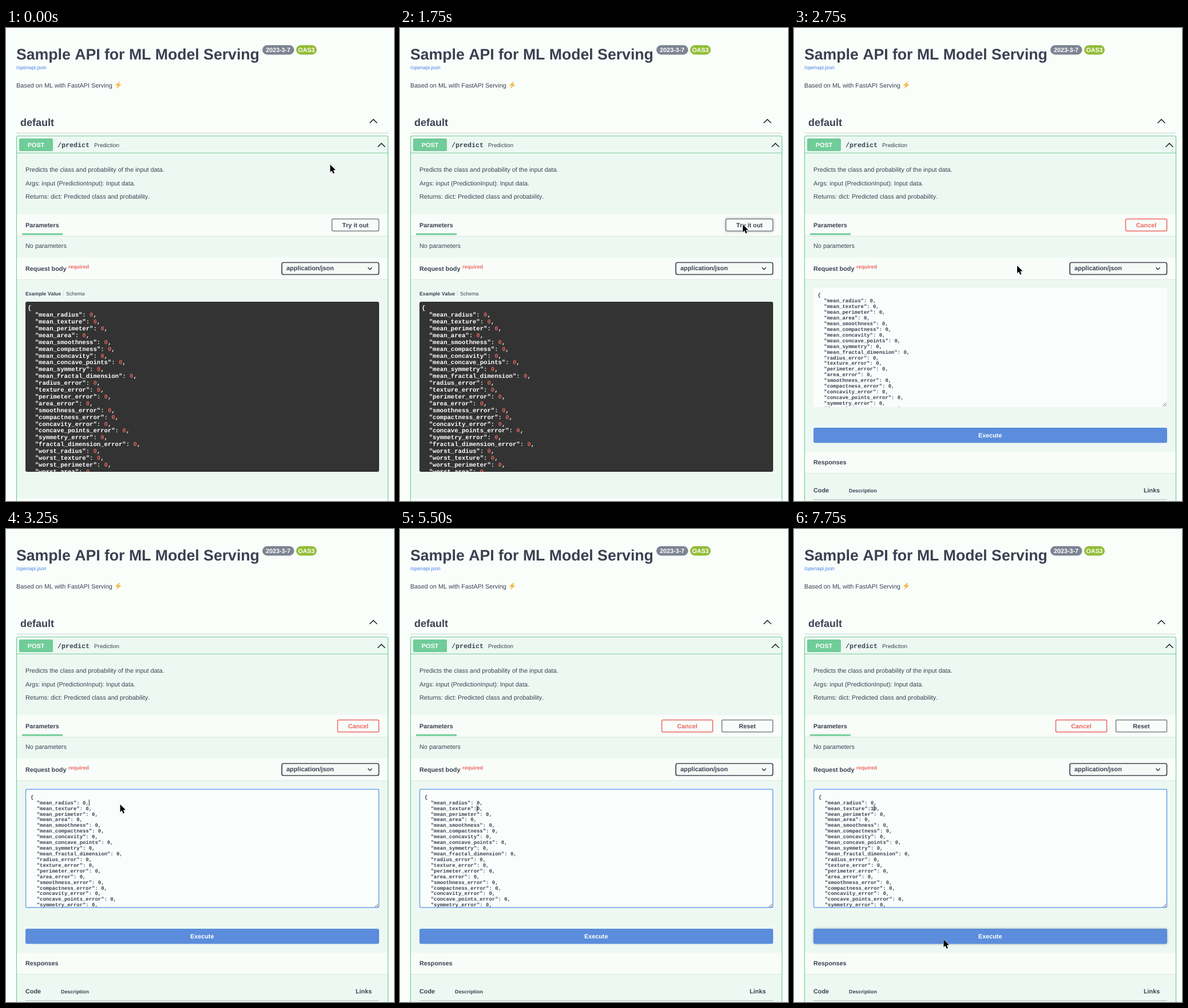
Recreate the animation shown at these times as an HTML page. Size 678x826 px, loop 8 s.

```html
<!DOCTYPE html>
<html lang="en">
<head>
<meta charset="utf-8">
<title>Sample API for ML Model Serving</title>
<style>
html, body { margin: 0; width: 100%; height: 100%; overflow: hidden; background: #f9fefb; }
svg { display: block; width: 100%; height: 100%; }
text {
  font: 10.87px "Liberation Sans", Arial, sans-serif;
  font-kerning: none; text-rendering: geometricPrecision;
  fill: #3b4151; white-space: pre;
}
.b { font-weight: 700; font-size: 10.8px; }
.s { font-size: 8.9px; }
.mid { text-anchor: middle; }
.w { fill: #fff; }
.mono { font-family: "Liberation Mono", "Courier New", monospace; font-weight: 700; }
.band { fill: #f8fdfa; }
.edge { fill: #000; opacity: .07; }
.green { fill: #70cc98; }
.btn { fill: #f8fdfa; stroke: #7d8088; stroke-width: 1.5; }
.red { stroke: #f0655d; }
text.red { fill: #f0655d; stroke: none; }
.pressed .red { stroke: #b65f5d; stroke-width: 2; }
.pressed text.red { fill: #a4504f; stroke: none; }
.line { fill: none; stroke: #25282f; stroke-width: 1.6; }
.hover { filter: drop-shadow(0 0 2px rgba(0, 0, 0, .3)); }
</style>
</head>
<body>
<svg viewBox="0 0 678 826">
  <defs>
    <clipPath id="darkClip"><rect x="34" y="478" width="618" height="297"/></clipPath>
    <clipPath id="editClip"><rect x="34" y="453" width="618" height="209"/></clipPath>
  </defs>

  <text class="b" x="18" y="55" style="font-size:26.65px">Sample API for ML Model Serving</text>
  <rect x="448" y="30" width="55.500" height="16.500" rx="8.200" fill="#7d8492"/>
  <text class="b w mid" x="475.500" y="42">2023-3-7</text>
  <rect x="507" y="30" width="36" height="16.500" rx="8.200" fill="#93bd38"/>
  <text class="b w mid" x="525" y="42" style="font-size:10.6px">OAS3</text>
  <text class="s" x="18" y="72" style="fill:#4681e6">/openapi.json</text>
  <text x="18" y="103.500">Based on ML with FastAPI Serving</text>
  <path d="M199 93 190.500 100.500H195L192.500 106 202 98.500H197.300Z" fill="#f7b84b"/>

  <text class="b" x="25" y="171" style="font-size:18px">default</text>
  <path class="line" d="M635.500 166 642 159.700 648.500 166"/>
  <rect x="18" y="183" width="650" height="1" fill="#cbd3d3"/>

  <rect x="18.500" y="188.500" width="649" height="660" rx="3" fill="#eef8f3" stroke="#70cc98" stroke-width="1.200"/>
  <rect class="green" x="19" y="217.700" width="648" height="1"/>
  <rect class="green" x="23" y="193" width="59" height="22" rx="2"/>
  <text class="b w mid" x="52.500" y="207.500">POST</text>
  <text class="mono" x="90" y="208" style="font-size:11.7px">/predict</text>
  <text x="154" y="208" style="font-size:9.9px">Prediction</text>
  <path class="line" d="M649.500 207.700 656 201.400 662.500 207.700"/>

  <text x="34" y="251">Predicts the class and probability of the input data.</text>
  <text x="34" y="274.500">Args: input (PredictionInput): Input data.</text>
  <text x="34" y="298">Returns: dict: Predicted class and probability.</text>

  <rect class="band" x="19" y="325" width="648" height="38"/>
  <rect class="edge" x="19" y="363" width="648" height="1"/>
  <text class="b" x="34" y="347.500">Parameters</text>
  <rect class="green" x="28" y="358.500" width="71" height="3"/>
  <text x="34" y="384">No parameters</text>

  <rect class="band" x="19" y="401" width="648" height="38"/>
  <rect class="edge" x="19" y="439" width="648" height="1"/>
  <text class="b" x="34" y="424">Request body</text>
  <text class="b red" x="109" y="419.500" style="font-size:9px">required</text>
  <rect x="482" y="409.500" width="169.500" height="21" rx="3" fill="#f5faf7" stroke="#41444e" stroke-width="1.700"/>
  <text class="b" x="490" y="423" style="font-size:10.9px">application/json</text>
  <path class="line" d="M632.500 418.300 636 421.800 639.500 418.300" style="stroke-width:1.3"/>

  <g id="view">
    <g id="tryBtn">
      <rect class="btn" x="569.500" y="333.500" width="82" height="21" rx="2.500"/>
      <text class="b mid" x="610.500" y="347.500">Try it out</text>
    </g>
    <text class="b s" x="34" y="467" style="font-size:8.8px">Example Value</text>
    <rect x="100" y="459" width="1" height="10" fill="#d3dbd8"/>
    <text class="s" x="105" y="467">Schema</text>
    <rect x="34" y="478" width="618" height="297" rx="3" fill="#333"/>
    <g id="dark" clip-path="url(#darkClip)"></g>
    <rect class="band" x="19" y="821" width="648" height="6"/>
  </g>

  <g id="edit">
    <g id="cancel">
      <rect id="cancelBox" class="btn red" y="333.500" height="21" rx="2"/>
      <text id="cancelText" class="b mid red" y="347.500">Cancel</text>
    </g>
    <g id="reset">
      <rect class="btn" x="562.500" y="333.500" width="89" height="21" rx="1.500"/>
      <text class="b mid" x="607" y="347.500">Reset</text>
    </g>
    <rect x="34" y="453.500" width="618" height="208.500" rx="3" fill="#f9fdfb"/>
    <rect id="focusRing" x="34.500" y="454.500" width="617" height="206.500" rx="2.500" fill="none" stroke="#6ba5ee" stroke-width="1.500"/>
    <g clip-path="url(#editClip)">
      <g id="body"></g>
    </g>
    <path class="line" d="M644.500 660.500 650.500 654.500M648 660.800 650.800 658" style="stroke:#555;stroke-width:1"/>
    <rect id="caret" width="1" height="11" fill="#222"/>
    <rect id="execute" x="34" y="698" width="618" height="26.500" rx="3" fill="#5b8ddc"/>
    <text class="b w mid" x="342.700" y="715">Execute</text>
    <rect class="band" x="19" y="740" width="648" height="37"/>
    <rect class="edge" x="19" y="777" width="648" height="1"/>
    <text class="b" x="34" y="762">Responses</text>
    <text class="b" x="34" y="811">Code</text>
    <text class="b s" x="96" y="810.500" style="font-size:8.9px">Description</text>
    <text class="b" x="611" y="811">Links</text>
    <rect x="34" y="823" width="618" height="1" fill="#b5bdc0"/>
  </g>

  <path id="pointer" d="M0 0V13.200L3 10.500 5.200 15.700 7.500 14.700 5.300 9.700 9.500 9.500Z" fill="#000" stroke="#fff" stroke-width="1" paint-order="stroke"/>
</svg>
<script>
const $ = id => document.getElementById(id);
const LOOP = 8000, STEP = 250;
const SWITCH = 2000, FOCUS = 3000, CLICK = 4750, ERASE = 5500, TYPE = 5750, MOVE = 6000, HOVER = 7000;

const features = ['radius', 'texture', 'perimeter', 'area', 'smoothness', 'compactness',
  'concavity', 'concave_points', 'symmetry', 'fractal_dimension'];
const keys = [
  ...features.map(f => 'mean_' + f),
  ...features.map(f => f + '_error'),
  ...features.map(f => 'worst_' + f)
];

function codeLines(parent, count, x, y, pitch, size, style, zero) {
  for (let i = 0; i <= count; i++) {
    const line = document.createElementNS('http://www.w3.org/2000/svg', 'text');
    line.setAttribute('class', 'mono ' + style);
    line.setAttribute('x', x);
    line.setAttribute('y', y + i * pitch);
    line.style.fontSize = size + 'px';
    line.innerHTML = i ? `  "${keys[i - 1]}": ${zero},` : '{';
    parent.append(line);
  }
}
codeLines($('dark'), 24, 38, 492.2, 11.9, 10.6, 'w', '<tspan fill="#d9645f">0</tspan>');
codeLines($('body'), 20, 41.6, 469.4, 9.92, 8.93, '', '0');
const texture = $('body').children[2];

// [time, x, y] of the pointer tip
const path = [
  [0, 566.5, 238.5], [500, 566.5, 238.5], [1000, 620, 174], [1250, 612, 189], [1500, 600, 335],
  [1750, 599, 343], [2250, 599, 343], [2500, 575, 349], [2750, 390, 415], [3000, 199.5, 481],
  [3250, 199.5, 481], [3750, 152, 486], [4250, 140, 492.500], [4500, 140, 492.500], [4750, 137, 487],
  [5000, 160, 505], [5750, 160, 505], [6000, 195, 590], [6250, 240, 686.5], [6750, 242, 688],
  [7000, 254, 706], [7250, 261.5, 717], [8000, 261.5, 717]
];

function pointerAt(t) {
  const i = path.findIndex(p => p[0] > t);
  const [t0, x0, y0] = path[i - 1], [t1, x1, y1] = path[i];
  const k = (t - t0) / (t1 - t0);
  return [x0 + (x1 - x0) * k, y0 + (y1 - y0) * k];
}

const show = (id, on) => $(id).setAttribute('display', on ? 'inline' : 'none');
const blink = (t, since) => Math.floor((t - since) / 500) % 2 === 0;

function draw(t) {
  const editing = t >= SWITCH, focused = t >= FOCUS, changed = t >= ERASE;
  show('view', !editing);
  show('edit', editing);
  show('reset', changed);
  show('focusRing', focused);
  $('tryBtn').classList.toggle('hover', t >= 1500);
  $('cancel').classList.toggle('pressed', t < SWITCH + STEP);
  $('cancel').classList.toggle('hover', t < 2500);
  $('execute').classList.toggle('hover', t >= HOVER);
  $('cancelBox').setAttribute('x', changed ? 457.5 : 579.5);
  $('cancelBox').setAttribute('width', changed ? 89 : 72);
  $('cancelText').setAttribute('x', changed ? 502 : 615.5);
  $('body').setAttribute('transform', focused ? 'translate(1.400 1.400)' : '');

  const value = t < ERASE ? ': 0,' : t < TYPE ? ':0,' : ':10,';
  texture.textContent = '  "mean_texture"' + value;

  const second = t >= CLICK;
  const typing = changed && t < TYPE;
  const start = t >= TYPE ? TYPE : changed ? ERASE : second ? CLICK : FOCUS;
  const column = !second ? 19 : typing ? 17 : 18;
  show('caret', focused && blink(t, start) && (second || t < 3750));
  $('caret').setAttribute('x', 43 + column * 5.36);
  $('caret').setAttribute('y', second ? 482.5 : 472.5);

  const [x, y] = pointerAt(t);
  $('pointer').setAttribute('transform', `translate(${x} ${y})`);
  show('pointer', t < ERASE || t >= MOVE);
}

function tick() {
  const t = performance.now() % LOOP;
  draw(Math.floor(t / STEP) * STEP);
  requestAnimationFrame(tick);
}
tick();
</script>
</body>
</html>
```
